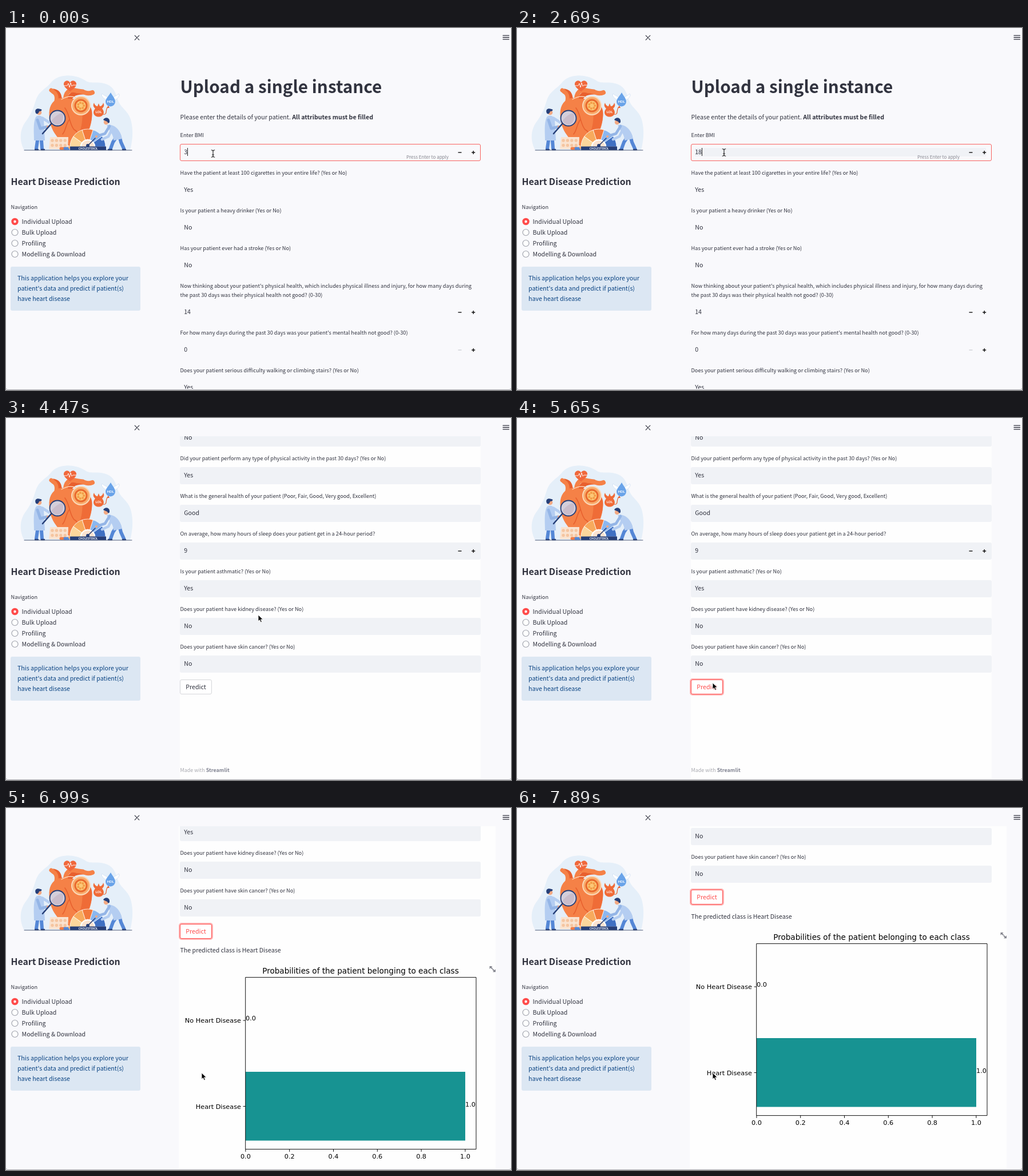
Write an HTML page that moves like this. It is 883 px wide and 634 px high and loops after 8000 ms.

```html
<!DOCTYPE html>
<html lang="en">
<head>
<meta charset="utf-8">
<title>Heart Disease Prediction</title>
<style>
html, body { margin: 0; width: 100%; height: 100%; overflow: hidden; background: #f9f9fc; }
#stage { position: relative; width: 883px; height: 634px; overflow: hidden; background: #f9f9fc; color: #31333f;
  font: 10.65px/20px "Noto Sans CJK JP", "Noto Sans CJK SC", "Noto Sans CJK KR", "Noto Sans CJK TC", sans-serif; }
#stage div, #stage svg { position: absolute; }
.t { white-space: pre; margin-top: -.07em; }
.label { font-size: 9.22px; }
.h1 { font-size: 29.7px; font-weight: 700; }
.h2 { font-size: 15.8px; font-weight: 700; }
.info { color: #0a4382; }
.hint { font-size: 8px; color: #84868f; }
.foot { font-size: 8.94px; color: #a8a9af; }
.foot b { color: #808391; }
#view { left: 0; width: 883px; bottom: 2px; overflow: hidden; }
#patch { top: 0; height: 634px; background: #fefefe; }
#doc { left: 0; width: 883px; }
.box { left: 304px; width: 526px; height: 30px; border-radius: 3px; }
.gray .box { background: #f0f2f6; }
#bmi { width: 524px; height: 28px; border: 1px solid #f8625f; }
#band { left: 311px; width: 509px; height: 15px; background: #f0f2f6; }
#caret { display: inline-block; width: 1px; height: 14px; background: #222; vertical-align: -3px; }
#btn { left: 304px; top: 1316.5px; width: 54px; height: 24px; line-height: 23px; text-align: center;
  background: #fff; border: 1px solid #d5d6da; border-radius: 3px; }
#btn.hover, #btn.focus { border-color: #ff4b4b; color: #ff4b4b; }
#btn.focus { box-shadow: 0 0 0 2px #ffb5b5; }
#btn.active { border-color: #ff4b4b; background: #ff4b4b; color: #fff; }
#edge { left: -2px; top: -20px; width: 885px; height: 651.5px; border: 1px solid #adadb1; border-radius: 6px; }
.plot text { font-family: "DejaVu Sans", sans-serif; font-size: 11.28px; fill: #000; }
</style>
</head>
<body>
<div id="stage"></div>
<script>
const LOOP = 8000;
const $ = id => document.getElementById(id);
const text = (x, y, s, cls = '') =>
  `<div class="t ${cls}" style="left:${x}px;top:${y - 10}px">${s}</div>`;
const svg = (x, y, w, h, body, attrs = '') =>
  `<svg ${attrs} style="left:${x}px;top:${y}px" width="${w}" height="${h}" viewBox="${x} ${y} ${w} ${h}">${body}</svg>`;
const path = (d, fill, stroke = 'none', w = 1) =>
  `<path d="${d}" fill="${fill}" stroke="${stroke}" stroke-width="${w}" stroke-linecap="round" stroke-linejoin="round"/>`;
const line = (d, color, w = 1) => path(d, 'none', color, w);
const circle = (x, y, r, fill, stroke = 'none', w = 1) =>
  `<circle cx="${x}" cy="${y}" r="${r}" fill="${fill}" stroke="${stroke}" stroke-width="${w}"/>`;
const repeat = (n, f) => Array.from({ length: n }, (_, i) => f(i)).join('');

// question, value, stepper: 1 = both buttons, 2 = minus disabled
const fields = [
  ['Enter BMI', '', 1],
  ['Have the patient at least 100 cigarettes in your entire life? (Yes or No)', 'Yes'],
  ['Is your patient a heavy drinker (Yes or No)', 'No'],
  ['Has your patient ever had a stroke (Yes or No)', 'No'],
  ["Now thinking about your patient's physical health, which includes physical illness and injury, for how many days during", '14', 1],
  ["For how many days during the past 30 days was your patient's mental health not good? (0-30)", '0', 2],
  ['Does your patient serious difficulty walking or climbing stairs? (Yes or No)', 'Yes'],
  ['Is your patient male or female?', 'Female'],
  ['Age of your patient in 5 year spans (18-24, 25-29, ... 75-79, 80 or older)', '75-79'],
  ['Enter Race (White, Black, Asian, American Indian/Alaskan Native, Hispanic or Other', 'Black'],
  ['Is your patient diabetic? (Yes or No)', 'No'],
  ['Did your patient perform any type of physical activity in the past 30 days? (Yes or No)', 'Yes'],
  ['What is the general health of your patient (Poor, Fair, Good, Very good, Excellent)', 'Good'],
  ['On average, how many hours of sleep does your patient get in a 24-hour period?', '9', 1],
  ['Is your patient asthmatic? (Yes or No)', 'Yes'],
  ['Does your patient have kidney disease? (Yes or No)', 'No'],
  ['Does your patient have skin cancer? (Yes or No)', 'No']
];

function stepper(y, kind) {
  const minus = kind === 2 ? '#cfd1d7' : '#111';
  return svg(788, y - 6, 36, 12,
    `<path d="M790.5 ${y}h6" stroke="${minus}" stroke-width="1.4"/>` +
    `<path d="M814.2 ${y}h6M817.2 ${y - 3}v6" stroke="#111" stroke-width="1.4"/>`);
}

function field([label, value, kind], i) {
  const y = 187.8 + 65.95 * i + (i > 4 ? 15.9 : 0);
  const mid = y + 30.1 + (i === 4 ? 15.9 : 0);
  let s = text(304.5, y, label, 'label');
  if (i === 4) s += text(304.5, y + 16, 'the past 30 days was their physical health not good? (0-30)', 'label');
  s += `<div class="box" ${i ? '' : 'id="bmi"'} style="top:${mid - 15}px"></div>`;
  if (!i) {
    s += '<div id="band" style="top:210px"></div>' + text(700, 226.5, 'Press Enter to apply', 'hint') +
      text(311.2, mid, '<span id="typed"></span><span id="caret"></span>');
  } else s += text(311.2, mid, value);
  return s + (kind ? stepper(mid, kind) : '');
}

function plot() {
  const tx = (x, y, s, anchor = 'start', extra = '') =>
    `<text x="${x}" y="${y}" text-anchor="${anchor}" ${extra}>${s}</text>`;
  const body = '<rect x="419" y="445" width="384" height="120.5" fill="#179392"/>' +
    '<path d="M418.7 279.6H822V580.6H418.7Z" fill="none" stroke="#111"/>' +
    tx(620, 273, 'Probabilities of the patient belonging to each class', 'middle', 'style="font-size:13.55px"') +
    ['No Heart Disease', 'Heart Disease'].map((s, i) => {
      const y = 355.1 + 150.4 * i;
      return tx(411, y + 4.1, s, 'end') + line(`M415 ${y}h3.7`, '#111');
    }).join('') +
    tx(419, 355.1, '0.0') + tx(803, 505.5, '1.0') +
    repeat(6, i => {
      const x = 418.9 + 76.8 * i;
      return tx(x, 597.3, (i / 5).toFixed(1), 'middle') + line(`M${x} 580.6v4`, '#111');
    });
  const arrows = 'M845.5 260h5l-1.7 1.7 2.5 2.4-1.4 1.4-2.5-2.4-1.9 1.9zM856 270.3h-5l1.7-1.7-2.5-2.4 1.4-1.4 2.5 2.4 1.9-1.9z';
  return `<div id="plot" style="top:1131px;left:0">${svg(302, 250, 554, 370, body, 'class="plot"')}</div>` +
    `<div id="expand" style="top:1131px;left:0">${svg(843, 258, 14, 14, path(arrows, '#85868f'))}</div>`;
}

function heartArt() {
  const navy = '#263f78', blue = '#5487d6', coat = '#b4cdf1', skin = '#f3a983';
  const org = '#f58147', deep = '#e8602e', pale = '#fbd3b4';
  const pt = (r, a) => `${143 + r * Math.cos(a)} ${208 - r * Math.sin(a)}`;
  const slice = (i, color) => {
    const a = Math.PI * (1 - i / 5), b = a - Math.PI / 5;
    return path(`M${pt(31, a)}A31 31 0 0 1 ${pt(31, b)}L${pt(13, b)}A13 13 0 0 0 ${pt(13, a)}Z`, color, '#fff', .7);
  };
  const tiny = (x, y, s, size) =>
    `<text x="${x}" y="${y}" text-anchor="middle" font-family="Lato, sans-serif" font-weight="700" font-size="${size}" fill="#fff">${s}</text>`;
  return svg(20, 78, 206, 142,
    path('M32 214C23 198 24 179 33 166C44 151 47 143 52 127C58 109 69 108 79 95C92 80 119 80 137 91C148 99 157 93 171 97C188 101 191 112 196 127C201 141 215 145 219 164C223 181 221 199 217 214Z', '#e5eff9') +
    // organ and vessels
    line('M95 139C93 121 94 113 83 111M110 134C109 117 120 112 134 112', deep, 9) +
    line('M104 132C102 111 112 106 124 110C138 111 141 117 151 113', org, 8) +
    line('M88 128C90 116 85 113 79 109', org, 7) +
    path('M84 128C94 119 106 124 114 124C134 123 151 134 150 156C149 181 133 205 118 208C99 206 81 185 77 165C74 149 75 136 84 128Z', org) +
    path('M130 126C146 129 153 142 150 158C147 181 131 203 118 208C130 184 139 161 130 126Z', '#ef6c37') +
    line('M103 140C112 152 110 167 119 178M111 160C104 169 105 179 99 186M119 178C126 181 127 188 123 196', deep, 1.6) +
    line('M97 125C107 119 116 119 123 122', pale, 1.4) +
    // pulse emblem
    path('M112 111C107 107 100 103 101 97C103 91 110 91 112 96C114 91 121 91 123 97C124 103 117 107 112 111Z', '#f0683c') +
    line('M101 101H107L109 97L111 104L113 96L115 102L117 100H123', '#fff', .9) +
    // artery section
    circle(131, 136, 17, '#fbd9b9') + circle(131, 136, 15, '#f9ab6b') + circle(131, 136, 11.5, '#e9692e') +
    circle(131, 136, 8.5, '#fcc777') +
    repeat(7, i => circle(131 + 5.2 * Math.cos(i * .9), 136 + 5.2 * Math.sin(i * .9), 2, '#f39b45')) +
    // lipid drops
    path('M175 126C168 122 166 117 168 115C172 119 176 119 178 122ZM191 126C198 122 199 117 197 115C193 119 190 119 188 122Z', '#fff', '#c3d7f0', .6) +
    path('M183 113C187 120 191 124 191 129A8.5 8.5 0 0 1 174 129C174 124 179 120 183 113Z', '#69a3e9') +
    tiny(182.6, 131, 'HDL', 6) +
    line('M170 151C178 153 173 142 178 139', deep, 1.2) + path('M176 140L179 136L181 140Z', deep) +
    path('M156 141C152 138 152 134 154 131C155 135 158 137 160 137L162 132L164 137C167 137 169 135 170 131C172 134 172 138 168 141C174 148 170 155.5 162 155.5S150 148 156 141Z', '#f06b38') +
    tiny(162, 149, 'LDL', 6) +
    // blister and capsules
    path('M77 191H109L108 212H75Z', '#fae3d0') +
    repeat(8, i => circle(81 + 7.4 * (i % 4), 197 + 8.5 * (i > 3), 2.7, '#f5c5a0')) +
    line('M96 211H103', '#f07b46', 5) + line('M103 211H109', blue, 5) + line('M111 209L118 211', '#f7b26f', 4.5) +
    // gauge
    path('M112 208A31 31 0 0 1 174 208Z', '#fff') +
    ['#fbd69c', '#f7aa5d', '#f27a3d', '#8bb7ef', '#3f70c2'].map((c, i) => slice(i, c)).join('') +
    path('M132 208A11 11 0 0 1 154 208Z', '#fbe3d0') +
    line('M143 206L156 193', navy, 1.6) + circle(143, 206, 3, navy) +
    `<rect x="112" y="207.5" width="63" height="6.5" fill="${navy}"/>` + tiny(143.5, 212.8, 'CHOLESTEROL', 4.8) +
    // doctor with lens
    line('M57 183L53 211M61 183L63 211', blue, 6) + line('M51 213H56M62 213H67', navy, 2.4) +
    path('M52 156C57 151 65 154 66 161L68 197H49C49 183 47 167 52 156Z', coat) +
    line('M55 161L60 176L72 173', '#94b5e6', 5) + line('M64 158L75 165', coat, 5) + circle(73, 173, 2.2, skin) +
    circle(58, 148, 4.3, skin) + path('M52 149C49 142 55 140 60 142C64 142 63 146 58 146C57 150 54 152 52 149Z', navy) +
    line('M79 168L64 185', navy, 2.6) + circle(90, 158, 13.5, '#d3cedb', navy, 1.8) +
    path('M80 162C86 154 92 150 99 149C102 160 97 169 90 169C85 169 81 166 80 162Z', '#c9bccb') +
    // doctor at the gauge
    line('M195 188L187 200L183 211M198 188L201 200L206 211', blue, 6) + line('M179 213H185M204 213H209', navy, 2.4) +
    path('M176 170C187 167 200 176 203 194L188 197C188 185 181 182 176 170Z', coat) +
    line('M181 172L173 185L160 189', '#94b5e6', 4.6) + line('M187 174L179 190L168 195', coat, 4.6) + circle(158, 190, 2.1, skin) +
    circle(175, 165, 4.2, skin) + path('M170 161C172 156 180 156 181 162C182 167 178 168 177 164Z', navy) +
    line('M32 214H220', '#4d5a78', 1));
}

const sidebar = heartArt() +
  svg(222, 10, 14, 14, line('M225.2 13.2L232.8 20.8M232.8 13.2L225.2 20.8', '#31333f', 1.2)) +
  svg(866, 10, 17, 14, line('M869 13.2H879.5M869 16.5H879.5M869 19.8H879.5', '#31333f', 1.3)) +
  text(8.5, 270, 'Heart Disease Prediction', 'h2') + text(8.5, 314, 'Navigation', 'label') +
  ['Individual Upload', 'Bulk Upload', 'Profiling', 'Modelling &amp; Download'].map((s, i) => {
    const y = 339.4 + 19 * i;
    const dot = i ? circle(15.5, y, 5.5, '#fff', '#a0a3ac', 1.2) : circle(15.5, y, 6.2, '#ff4b4b') + circle(15.5, y, 2.2, '#fff');
    return svg(8, y - 8, 16, 16, dot) + text(27.5, y, s);
  }).join('') +
  '<div style="left:8px;top:417.5px;width:227px;height:77.5px;border-radius:3px;background:#dce7f3"></div>' +
  ['This application helps you explore your', "patient's data and predict if patient(s)", 'have heart disease']
    .map((s, i) => text(20, 439 + 18 * i, s, 'info')).join('');

$('stage').innerHTML = `<div id="view"><div id="patch"></div><div id="doc">
  ${text(304.5, 104, 'Upload a single instance', 'h1')}
  ${text(304.5, 157, 'Please enter the details of your patient. <b>All attributes must be filled</b>')}
  ${fields.map(field).join('')}
  <div id="btn">Predict</div>
  <div id="result" style="top:0;left:0">${text(304.5, 1364, 'The predicted class is Heart Disease')}</div>
  <div id="foot" style="top:0;left:0">${text(304.5, 1476.5, 'Made with <b>Streamlit</b>', 'foot')}</div>
  ${plot()}</div></div>${sidebar}<div id="edge"></div>
  <svg id="beam" width="10" height="16" viewBox="-5 -8 10 16" style="left:0;top:0">
    ${line('M-2.8 -6.2Q0 -6 0 -4Q0 -6 2.8 -6.2M0 -4V4M-2.8 6.2Q0 6 0 4Q0 6 2.8 6.2M-1.5 2H1.5', '#222', 1.1)}</svg>
  <svg id="arrow" width="12" height="17" viewBox="-1.5 -1.5 12 17" style="left:0;top:0">
    ${path('M0 0V11L2.6 8.7L4.4 12.8L6.4 11.9L4.6 7.9H8.2Z', '#000', '#fff', .9)}</svg>`;

// each track: [start ms, value...]
const tracks = {
  typed: [[0, '3'], [300, ''], [1490, '1'], [1640, '18']],
  caret: [[0, 1], [750, 0], [1200, 1], [2090, 0], [2690, 1]],
  scroll: [[0, 0], [2990, 30], [3130, 130], [3280, 270], [3430, 390], [3580, 481.5], [3720, 640], [3870, 790],
    [4020, 858.5], [6390, 915], [6540, 997.5], [6690, 1055], [6840, 1092], [6990, 1114], [7140, 1126], [7290, 1131],
    [7590, 1144], [7740, 1163], [7890, 1173.5]],
  mouse: [[0, 362, 220], [2690, 362, 218], [2840, 405, 247], [2990, 472, 292], [4470, 441, 345], [4620, 413, 388],
    [4770, 385, 424], [4910, 363, 449], [5060, 348, 460], [5200, 342, 464]],
  button: [[0, ''], [5060, 'hover'], [5500, 'active'], [5650, 'focus']],
  // left, right and top of the white area
  area: [[0, 0, 0, 32], [2990, 304, 830, 40], [3870, 304, 830, 32], [5950, 302, 830, 32], [6840, 302, 856, 32]]
};
const at = (name, t) => tracks[name].filter(k => k[0] <= t).pop().slice(1);
const show = (id, on) => { $(id).style.visibility = on ? 'visible' : 'hidden'; };

function draw(t) {
  const [scroll] = at('scroll', t), [x, y] = at('mouse', t), [left, right, top] = at('area', t);
  $('typed').textContent = at('typed', t)[0];
  show('caret', at('caret', t)[0]);
  show('band', t >= 300);
  $('view').style.top = top + 'px';
  $('patch').style.left = left + 'px';
  $('patch').style.width = right - left + 'px';
  $('doc').style.top = -scroll - top + 'px';
  $('doc').className = right ? 'gray' : '';
  $('btn').className = at('button', t)[0];
  show('foot', t < 5800);
  show('result', t >= 5800);
  show('plot', t >= 5950);
  show('expand', t >= 6840);
  show('beam', t < 2840);
  show('arrow', t >= 2840);
  $('beam').style.transform = `translate(${x - 5}px, ${y - 8}px)`;
  $('arrow').style.transform = `translate(${x - 1.5}px, ${y - 1.5}px)`;
}

const start = performance.now();
function tick() {
  draw((performance.now() - start) % LOOP);
  requestAnimationFrame(tick);
}
tick();
</script>
</body>
</html>
```
